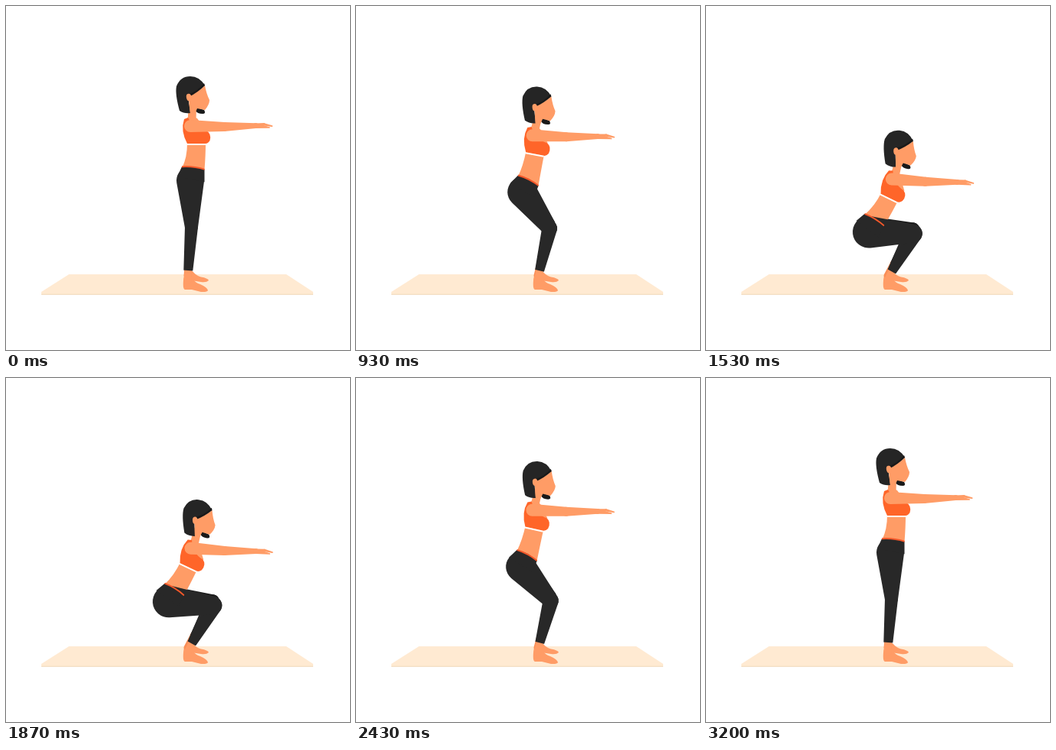
An HTML page with a canvas for the animation above (3230 ms loop, 448 by 450 pixels).

```html
<!DOCTYPE html>
<html lang="en">
<head>
<meta charset="utf-8">
<title>Squat exercise</title>
<style>
  html, body { margin: 0; width: 100%; height: 100%; overflow: hidden; background: #fff; }
  canvas { display: block; width: 448px; height: 450px; }
</style>
</head>
<body>
<canvas id="stage"></canvas>
<script>
const LOOP = 3230, START = 345, BOTTOM = 1645, END = 3160;
const SKIN = '#ff9c66', SKIN_DARK = '#f98f58', TOP = '#ff6529', WAIST = '#f4582a';
const PANTS = '#282828', PANTS_FAR = '#1d1d1d', HAIR = '#252525', HAIR_DARK = '#191919';
const THIGH = 61, SHANK = 68;
const NEAR = { shift: 0, width: 1, hem: 11, color: PANTS, skin: SKIN };
const FAR = { shift: -6, width: .7, hem: 15, color: PANTS_FAR, skin: SKIN_DARK };

const SHAPES = {
  mat: 'M82 351H365L400 374V377H46V374Z',
  matEdge: 'M46 376.8H400V377.8H46Z',
  farFoot: 'M235 347H243Q248 353 254 354.5Q263 356 264 359Q261 362 254 361L235 358Z',
  nearFoot: 'M231.5 355H242Q246 362 253 364Q262 368 263 372Q262 374.5 254 374L242 371H233Q229.5 370 231.5 355Z',
  pelvis: 'M-11 -18Q4 -19 18.5 -14.5V2L-17 -5Z',
  waistband: 'M-11 -19Q4 -20 18.5 -15.5V-13.5Q4 -18 -11 -17Z',
  chest: 'M-14 -30L-6 -37L1 -34Q6 -26 14 -18H-12Z',
  bra: 'M-16 -33L-11 -35Q-4 -20 13 -18Q20 -14 17.5 -5Q15 -1 12 -1H-12Q-21 -18 -16 -33Z',
  band: 'M-12.3 -1H12V1H-12.3Z',
  farHair: 'M5 15L16 19Q19 24 14 24Q7 24 5 20Z',
  hair: 'M-5 1L-2 23Q-10 24 -16 20Q-22 -2 -20 -12Q-15 -25 -2 -25Q10 -25 17 -13Z',
  face: 'M-4 0Q8 -4 17 -13Q19 -2 23 6Q23 12 17 19L7 17L4 24H-2L-4 6Z',
  fringe: 'M-5 -1Q8 -6 16 -16L17 -13Q8 -4 -4 2Z'
};

const canvas = document.getElementById('stage');
const ctx = canvas.getContext('2d');
const ratio = window.devicePixelRatio || 1;
canvas.width = 448 * ratio;
canvas.height = 450 * ratio;

const rad = deg => deg * Math.PI / 180;

function fill(name, color) {
  ctx.fillStyle = color;
  ctx.fill(new Path2D(SHAPES[name]));
}

// Tapered limb: the hull of two circles
function limb(color, a, ra, b, rb) {
  const dx = b[0] - a[0], dy = b[1] - a[1];
  const axis = Math.atan2(dy, dx), spread = Math.acos((ra - rb) / Math.hypot(dx, dy));
  ctx.beginPath();
  ctx.arc(a[0], a[1], ra, axis + spread, axis - spread + 2 * Math.PI);
  ctx.arc(b[0], b[1], rb, axis - spread, axis + spread);
  ctx.fillStyle = color;
  ctx.fill();
}

function place(part, x, y) {
  const c = Math.cos(rad(part.tilt)), s = Math.sin(rad(part.tilt));
  return [part.x + x * c - y * s, part.y + x * s + y * c];
}

function within(part, draw) {
  ctx.save();
  ctx.translate(part.x, part.y);
  ctx.rotate(rad(part.tilt));
  draw();
  ctx.restore();
}

const ease = x => x ** 1.8 / (x ** 1.8 + (1 - x) ** 1.8);

function depthAt(ms) {
  if (ms <= START || ms >= END) return 0;
  return .985 * (ms < BOTTOM
    ? ease((ms - START) / (BOTTOM - START))
    : ease((END - ms) / (END - BOTTOM)));
}

function poseAt(d) {
  const back = Math.sin(Math.PI / 2 * Math.min(1, d / .69));
  const drop = 75 * d ** 1.9;
  return {
    hip: { x: 240 - 31 * back, y: 228.2 + 68 * d ** 1.75, tilt: 25 * back },
    chest: { x: 248 - 57 * d + 48 * d * d, y: 181 + drop, tilt: 27 * d },
    head: { x: 242 - 29 * d + 40 * d * d, y: 117 + drop, tilt: 6 * d }
  };
}

// Two-bone solve, knee pointing forward
function kneeOf(hip, ankle) {
  const dx = ankle[0] - hip[0], dy = ankle[1] - hip[1];
  const dist = Math.hypot(dx, dy), ux = dx / dist, uy = dy / dist;
  const along = (THIGH ** 2 - SHANK ** 2 + dist ** 2) / (2 * dist);
  const out = Math.sqrt(Math.max(0, THIGH ** 2 - along ** 2));
  return [hip[0] + along * ux + out * uy, hip[1] + along * uy - out * ux];
}

function leg({ x, y }, d, { shift, width, hem, color, skin }) {
  const ankle = [236.5, 357 + shift];
  const knee = kneeOf([x, y + shift], ankle);
  const onShank = up => ankle.map((v, i) => v + (knee[i] - v) * up / SHANK);
  const kneeSize = (8.5 + 3.5 * d) * width;
  limb(skin, [236.5, 359 + shift], 5, onShank(hem + 2), 4.5);

  // Cut the trouser leg straight across at the hem
  const lean = Math.atan2(knee[1] - ankle[1], knee[0] - ankle[0]);
  const [hx, hy] = onShank(hem);
  ctx.save();
  ctx.translate(hx, hy);
  ctx.rotate(lean);
  ctx.beginPath();
  ctx.rect(0, -40, 100, 80);
  ctx.restore();
  ctx.save();
  ctx.clip();
  limb(color, knee, kneeSize, [hx, hy], 6 * width);
  ctx.restore();

  limb(color, [x + 3 * d, y + shift + 3 * d], (18 + 3 * d) * width, knee, kneeSize);
}

function belly(chest, hip) {
  ctx.beginPath();
  ctx.moveTo(...place(chest, -12, -2));
  ctx.lineTo(...place(chest, 12, -2));
  ctx.quadraticCurveTo(...place(chest, 12, 14), ...place(hip, 18.5, -14));
  ctx.lineTo(...place(hip, -10.5, -17));
  ctx.quadraticCurveTo(...place(chest, -12, 17), ...place(chest, -12, -2));
  ctx.fillStyle = SKIN;
  ctx.fill();
}

function pelvis() {
  fill('pelvis', PANTS);
  fill('waistband', WAIST);
}

function torso() {
  fill('chest', SKIN);
  fill('bra', TOP);
  fill('band', '#fff');
}

function head() {
  fill('farHair', HAIR_DARK);
  fill('hair', HAIR);
  fill('face', SKIN);
  fill('fringe', HAIR_DARK);
  ctx.beginPath();
  ctx.ellipse(-3.8, 2.5, 3.3, 4.8, rad(-10), 0, 2 * Math.PI);
  ctx.fillStyle = SKIN;
  ctx.fill();
}

function arm() {
  const elbow = [45, 2], wrist = [86, .6];
  limb(SKIN, [1, 1], 8, elbow, 6);
  limb(SKIN, elbow, 6, wrist, 3.4);
  limb(SKIN, wrist, 3.2, [97, -1.4], 1.5);
  limb(SKIN, [97, -1.2], 1.6, [107.5, 1], .9);
  limb(SKIN, wrist, 3.4, [104, 3], .8);
}

function draw(ms) {
  const d = depthAt(ms);
  const { hip, chest, head: skull } = poseAt(d);
  const [sx, sy] = place(chest, -9, -25);

  ctx.setTransform(ratio, 0, 0, ratio, 0, 0);
  ctx.fillStyle = '#fff';
  ctx.fillRect(0, 0, 448, 450);
  fill('mat', '#ffead2');
  fill('matEdge', '#efd5b4');
  fill('farFoot', SKIN);
  leg(hip, d, FAR);
  fill('nearFoot', SKIN);
  belly(chest, hip);
  leg(hip, d, NEAR);
  within(hip, pelvis);
  limb(SKIN, place(skull, 1, 14), 5, place(chest, -6, -31), 5.5);
  within(chest, torso);
  within(skull, head);
  within({ x: sx, y: sy, tilt: 3 * d }, arm);
}

function tick() {
  draw(performance.now() % LOOP);
  requestAnimationFrame(tick);
}
tick();
</script>
</body>
</html>
```
